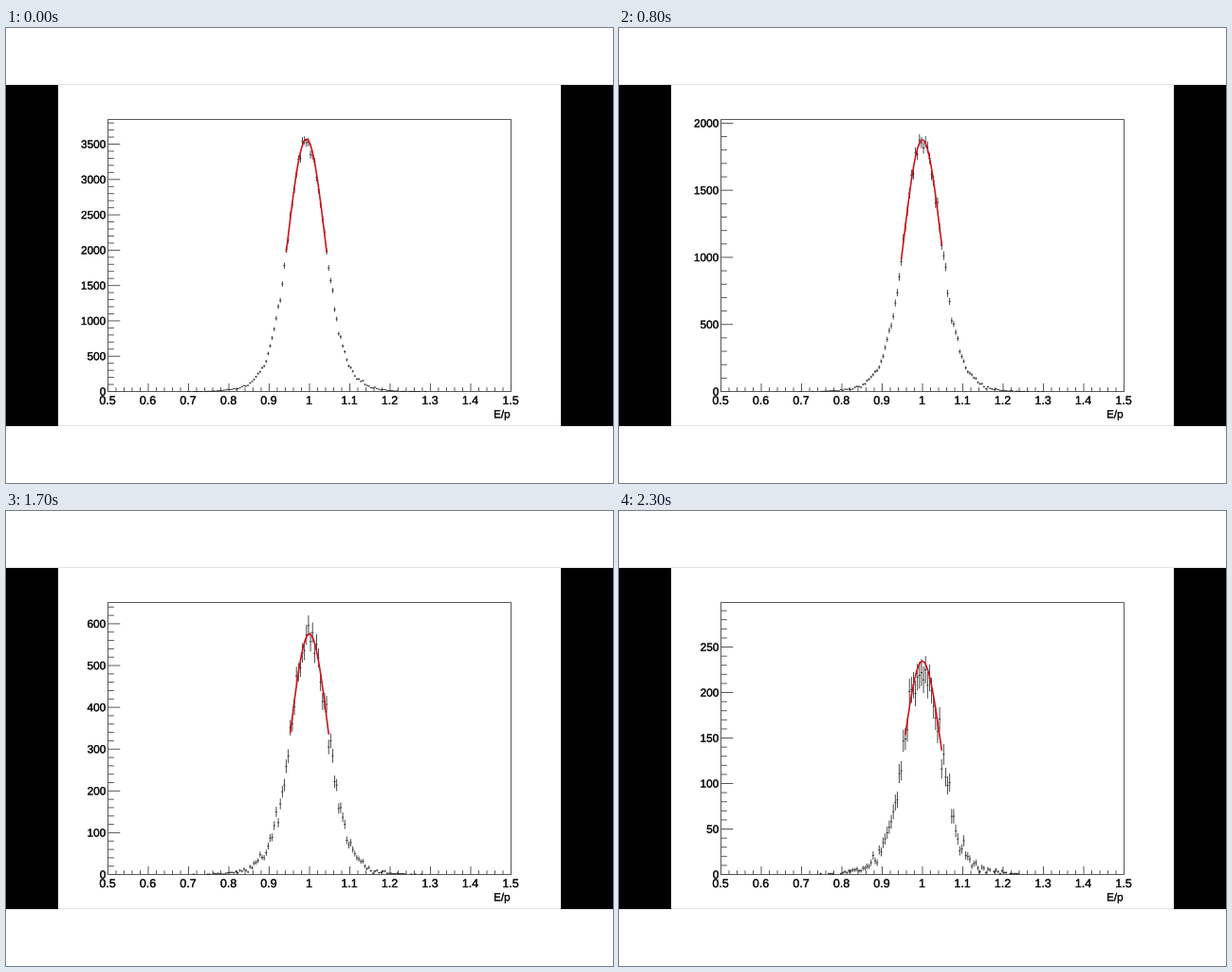
Recreate the animation shown at these times as a matplotlib script. Size 640 by 480 pixels, loop 2.4 s.

```python
import numpy as np
import matplotlib.pyplot as plt
from matplotlib.animation import FuncAnimation
from matplotlib.collections import LineCollection
from matplotlib.patches import Rectangle
from matplotlib.patheffects import withStroke

plt.rcParams["path.snap"] = False

FRAMES, INTERVAL = 24, 100
W, H, DPI = 640, 480, 100
PX = 72 / DPI                       # one pixel in points
X0, X1, Y0, Y1 = 107.5, 532.5, 383.5, 96.5
BINS = 200
STEP = (X1 - X0) / BINS
CENTERS = X0 + STEP * (np.arange(BINS) + 0.5)
SIGMA = 19.6
INK = "#505050"

# axis maximum at a few times, interpolated in log scale
TIMES = [0, 2, 6, 11, 15, 19, 23]
TOPS = [3849, 4268, 2623, 1378, 810, 523, 299]


def scatter(keep=0.94, seed=12):
    """Unit noise per bin; successive samples share most of their events."""
    rng = np.random.default_rng(seed)
    rows = [rng.normal(size=BINS)]
    for _ in range(FRAMES - 1):
        fresh = rng.normal(size=BINS)
        rows.append(keep * rows[-1] + np.sqrt(1 - keep ** 2) * fresh)
    return np.array(rows)


NOISE = scatter()


def gauss(x, mean, sigma):
    return np.exp(-0.5 * ((x - mean) / sigma) ** 2)


def nearest_bin(x):
    return CENTERS[np.argmin(abs(CENTERS - x))]


def nice_step(top):
    """Smallest 1-2-5 step giving at most ten divisions, and its parts."""
    for p in range(5):
        for m, parts in ((1, 5), (2, 4), (5, 5)):
            if top / (m * 10 ** p) <= 10:
                return m * 10 ** p, parts


def crosses_at(t, top, scale, mean, peak):
    """Error crosses of the histogram: a bin-wide bar and a sqrt(n) bar."""
    shape = (0.81 * gauss(CENTERS, mean, 0.92 * SIGMA)
             + 0.19 * gauss(CENTERS, mean, 1.6 * SIGMA))
    mu = peak * shape / scale
    n = np.round(mu + NOISE[t] * np.sqrt(mu))
    # the highest error bar stays 5 % below the axis maximum
    limit = (np.sqrt(top / 1.05 + 0.25) - 0.5) ** 2
    n = np.minimum(n, limit)
    segs = []
    for x, v in zip(CENTERS, n):
        if v < 1:
            continue
        y, e = Y0 - v * scale, np.sqrt(v) * scale
        segs.append([(x - STEP / 2, y), (x + STEP / 2, y)])
        segs.append([(x, y - e), (x, min(y + e, Y0))])
    return segs


fig = plt.figure(figsize=(W / DPI, H / DPI), dpi=DPI, facecolor="white")
ax = fig.add_axes([0, 0, 1, 1])
ax.set(xlim=(0, W), ylim=(H, 0))
ax.axis("off")


def label(x, y, s, size, ha="center"):
    return ax.text(x, y, s, fontsize=size * PX, family="Liberation Sans",
                   color="#101010", ha=ha, va="baseline",
                   path_effects=[withStroke(linewidth=0.25 * PX,
                                            foreground="#101010")])


def lines(segs, color=INK, width=0.95, z=2):
    return ax.add_collection(LineCollection(
        segs, colors=color, linewidths=width * PX, zorder=z))


for x in (0, 585):
    ax.add_patch(Rectangle((x, 60), 55, 360, color="black", lw=0))
lines([[(55, y), (585, y)] for y in (59.5, 419.5)], "#e2e2e2")
ax.add_patch(Rectangle((X0, Y1), X1 - X0, Y0 - Y1, fill=False,
                       ec=INK, lw=0.95 * PX))

xticks = []
for i in range(51):
    x = X0 + (X1 - X0) * i / 50
    xticks.append([(x, Y0), (x, Y0 - (4.3 if i % 5 else 8.6))])
    if i % 5 == 0:
        label(x - 0.5, 397, f"{0.5 + i / 50:.2g}", 12.5)
lines(xticks)
label(X1 - 0.8, 411.3, "E/p", 11.7, ha="right")

yticks = lines([])
ylabels = [label(105.4, Y0, "", 11.8, ha="right") for _ in range(11)]
crosses = lines([], "#202020", 0.8, 3)
fit, = ax.plot([], [], color="#d2101c", lw=1.6 * PX, zorder=4)


def update(t):
    top = np.exp(np.interp(t, TIMES, np.log(TOPS)))
    scale = (Y0 - Y1) / top
    droop = (t / (FRAMES - 1)) ** 4
    mean = 319.9 - 3.1 * np.exp(-t / 1.2)
    peak = 266 - 41 * droop

    major, parts = nice_step(top)
    minor = major / parts
    segs = []
    for i in range(int(top / minor) + 1):
        y = Y0 - i * minor * scale
        segs.append([(X0, y), (X0 + (6.4 if i % parts else 12.8), y)])
    yticks.set_segments(segs)
    for i, text in enumerate(ylabels):
        v = i * major
        text.set_text(str(v) if v <= top else "")
        text.set_y(Y0 - v * scale + 4.1)

    crosses.set_segments(crosses_at(t, top, scale, mean, peak))
    x = np.linspace(nearest_bin(mean - 22 + 4.6 * droop),
                    nearest_bin(mean + 20.5), 80)
    fit.set_data(x, Y0 - peak * gauss(x, mean, SIGMA))
    return [yticks, crosses, fit, *ylabels]


anim = FuncAnimation(fig, update, frames=FRAMES, interval=INTERVAL,
                     repeat=True, repeat_delay=0, blit=False)
plt.show()
```
